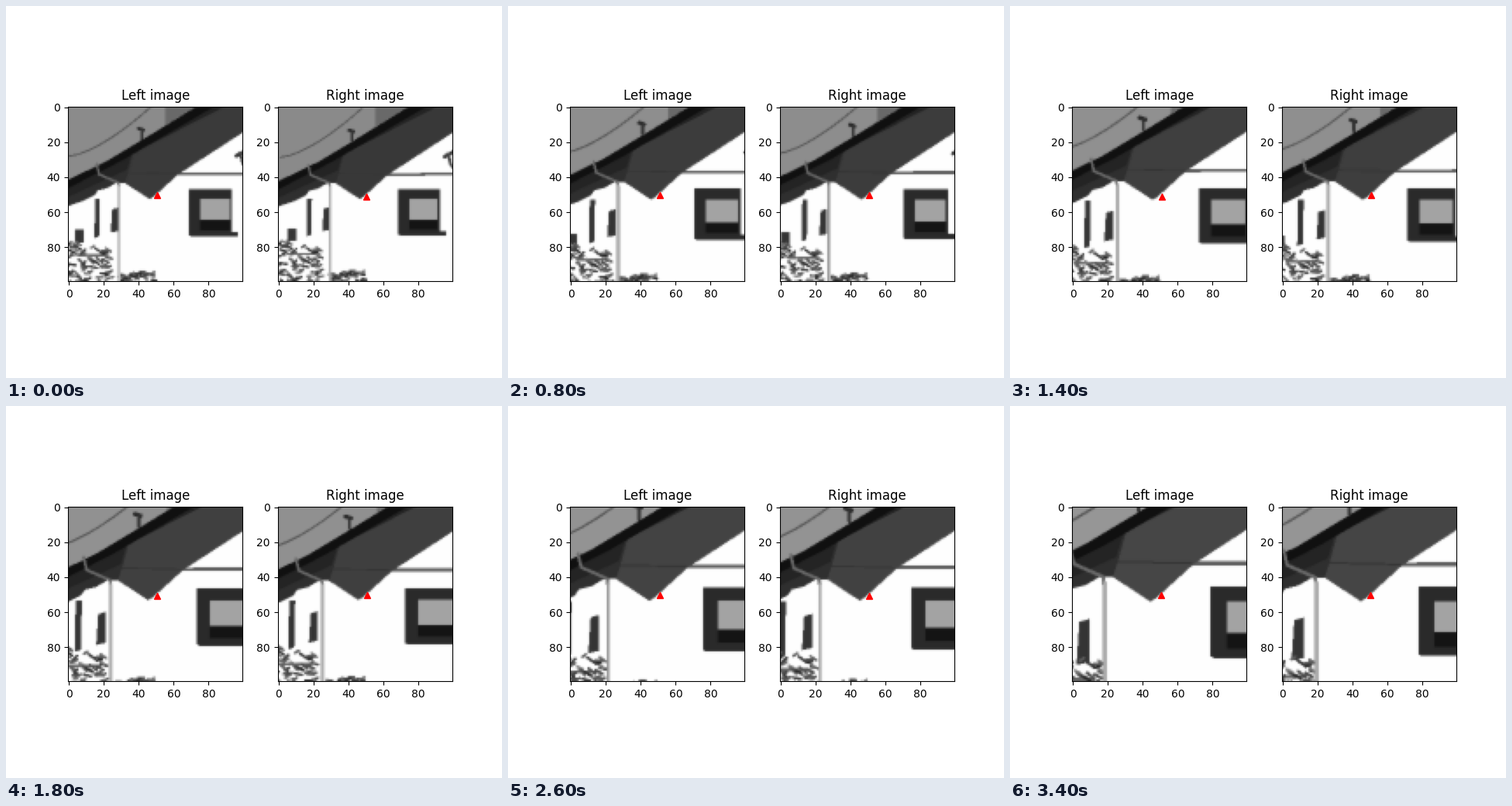
Write a matplotlib script that moves like this. It is 640 px wide and 480 px high and loops after 3600 ms.

```python
import numpy as np
import matplotlib.pyplot as plt
from matplotlib.animation import FuncAnimation
from matplotlib.path import Path

FRAMES, INTERVAL = 18, 200
SIZE, OVER = 100, 2
N = SIZE * OVER
STEP = 225.45 / N                  # one sample in screen pixels
AXIS = (np.arange(N) + 0.5) * STEP
TIP = np.array([113, 114])         # tracked eave tip, centre of the zoom
LAG = 1.3                          # the right camera trails the left one


def box(x0, y0, x1, y1):
    return [(x0, y0), (x1, y0), (x1, y1), (x0, y1)]


def make_twigs(seed, count, x0, width, height):
    """Random leaves, thicker towards the lower left."""
    rng = np.random.default_rng(seed)
    base = np.column_stack([x0 + width * rng.random(count) ** 1.3,
                            229 - height * rng.random(count) ** 1.3])
    angle = rng.uniform(-0.8, 0.8, count)
    reach = rng.uniform(1, 5, count)
    arm = np.column_stack([np.cos(angle), np.sin(angle)]) * reach[:, None]
    ends = np.stack([base - arm, base + arm], axis=1)
    return list(zip(ends, rng.uniform(30, 130, count)))


SHRUB = make_twigs(4, 75, -3, 58, 54)
BUSH = make_twigs(9, 45, 67, 45, 18)


class Camera:
    """Draws parts given in their opening place, zoomed for one moment."""

    def __init__(self, time):
        self.time = time
        self.img = np.full((N, N), 254.0)

    def zoom(self, depth):
        return depth / (depth - self.time)

    def place(self, pts, depth):
        return TIP + (np.array(pts, float) - TIP) * self.zoom(depth)

    def region(self, pts, pad):
        lo = np.clip((pts.min(0) - pad) // STEP, 0, N).astype(int)
        hi = np.clip((pts.max(0) + pad) // STEP + 1, 0, N).astype(int)
        gx, gy = np.meshgrid(AXIS[lo[0]:hi[0]], AXIS[lo[1]:hi[1]])
        return self.img[lo[1]:hi[1], lo[0]:hi[0]], gx, gy

    def fill(self, tone, pts, depth=50):
        pts = self.place(pts, depth)
        area, gx, gy = self.region(pts, 1)
        if area.size:
            grid = np.column_stack([gx.ravel(), gy.ravel()])
            area[Path(pts).contains_points(grid).reshape(gx.shape)] = tone

    def stroke(self, tone, pts, width, depth=50):
        pts, width = self.place(pts, depth), width * self.zoom(depth)
        for p, q in zip(pts[:-1], pts[1:]):
            area, gx, gy = self.region(np.array([p, q]), width)
            dx, dy = q - p
            t = ((gx - p[0]) * dx + (gy - p[1]) * dy) / (dx * dx + dy * dy)
            t = np.clip(t, 0, 1)
            gap = np.hypot(gx - p[0] - t * dx, gy - p[1] - t * dy)
            area[gap < width / 2] = tone

    def photo(self):
        """Shrink to the panel's pixels with a slight lens softness."""
        small = self.img.reshape(SIZE, OVER, SIZE, OVER).mean((1, 3))
        pad = np.pad(small, 1, mode="edge")
        rows = 0.07 * (pad[:-2] + pad[2:]) + 0.86 * pad[1:-1]
        return 0.07 * (rows[:, :-2] + rows[:, 2:]) + 0.86 * rows[:, 1:-1]


def garden(cam):
    for pane in ([(35, 120), (41, 120), (40, 168), (34, 170)],
                 [(57, 133), (64, 131), (64, 161), (55, 163)],
                 box(9, 159, 20, 176)):
        cam.fill(52, pane, depth=37)
    cam.stroke(100, [(16, 192), (52, 192)], 3, depth=60)
    for twigs, depth in ((SHRUB, 90), (BUSH, 120)):
        for ends, tone in twigs:
            cam.stroke(tone, ends, 3, depth)


def wall(cam):
    cam.fill(42, box(156, 107, 211, 167))
    cam.fill(42, box(158, 162, 219, 168))
    cam.fill(164, box(170, 120, 208, 147))
    cam.fill(20, box(170, 147, 208, 160))
    cam.stroke(90, [(140, 87.5), (236, 87)], 3.5)
    cam.stroke(55, [(217, 64), (232, 56)], 5)
    cam.stroke(70, [(222, 60), (225, 74), (234, 84)], 4)


def eaves(cam):
    shadow_edge = [(73, 99), (62, 99), (50, 106), (38, 109), (34, 115), (20, 122), (-6, 131)]
    cam.fill(58 + 0.7 * cam.time,
             [(-6, 88), (175, -6), (236, -6), (236, 27), (142, 88), (110, 117),
              (105, 120)] + shadow_edge)
    cam.stroke(53, [(75, 86), (140, 87.5)], 1.5)
    cam.fill(47, [(-6, 95), (60, 60), (84, 62), (78, 84)] + shadow_edge)
    cam.fill(36, [(-6, 96), (175, -6), (215, -6), (82, 62), (76, 82), (-6, 120)])
    cam.fill(16, [(-6, 96), (175, -6), (200, -6), (70, 70), (-6, 109)])


def roof(cam):
    cam.fill(139 + 0.65 * cam.time,
             [(-9, -9), (180, -9), (165, 1), (100, 41), (50, 71), (-6, 98)])
    cam.fill(106, [(125, -9), (180, -9), (165, 1), (125, 25)])
    x = np.linspace(0, 1, 9)
    cam.stroke(84, np.column_stack([108 * x, 65 * (1 - x ** 1.5)]), 2)
    cam.stroke(40, [(91, 29), (97, 31)], 4.5)
    cam.stroke(50, [(95, 31), (95, 42)], 3.5)


def gutter(cam):
    cam.stroke(105, [(37, 75), (40, 88), (65, 99), (66, 110)], 3)
    cam.stroke(145, [(66, 104), (66, 240)], 3.8)
    cam.stroke(195, [(66.6, 104), (66.6, 240)], 1.8)


def scene(time):
    cam = Camera(time)
    for draw in (garden, wall, eaves, roof, gutter):
        draw(cam)
    return cam.photo()


def track(view, i):
    """Sub-pixel wobble of the tracked point."""
    if view == 0:
        x = np.interp(i, (0, 4, 7, 11, 13, 17), (0.6, 0.95, 0.95, 0.1, 0.9, 0.6))
        y = np.interp(i, (4, 7, 9, 11, 13), (0.2, 1, 0.6, 0.6, 0.2))
    else:
        x = np.interp(i, (0, 4, 13, 17), (0.3, 0.75, 0.75, 0.3))
        y = np.interp(i, (0, 4, 9, 12, 17), (1, 0.2, 0.2, 0.6, 0.2))
    return [50 + x], [50 + y]


VIEWS = [[scene(i - lag) for i in range(FRAMES)] for lag in (0, LAG)]

fig, axes = plt.subplots(1, 2, figsize=(6.4, 4.8), dpi=100)
pictures, markers = [], []
for ax, title, views in zip(axes, ("Left image", "Right image"), VIEWS):
    pictures.append(ax.imshow(views[0], cmap="gray", vmin=0, vmax=255))
    markers += ax.plot([50], [50], "r^")
    ax.set(title=title, xlim=(-0.5, SIZE - 0.5), ylim=(SIZE - 0.5, -0.5),
           xticks=range(0, SIZE, 20), yticks=range(0, SIZE, 20))


def update(i):
    for view, (picture, marker) in enumerate(zip(pictures, markers)):
        picture.set_data(VIEWS[view][i])
        marker.set_data(*track(view, i))
    return pictures + markers


anim = FuncAnimation(fig, update, frames=FRAMES, interval=INTERVAL, repeat=True)
plt.show()
```
